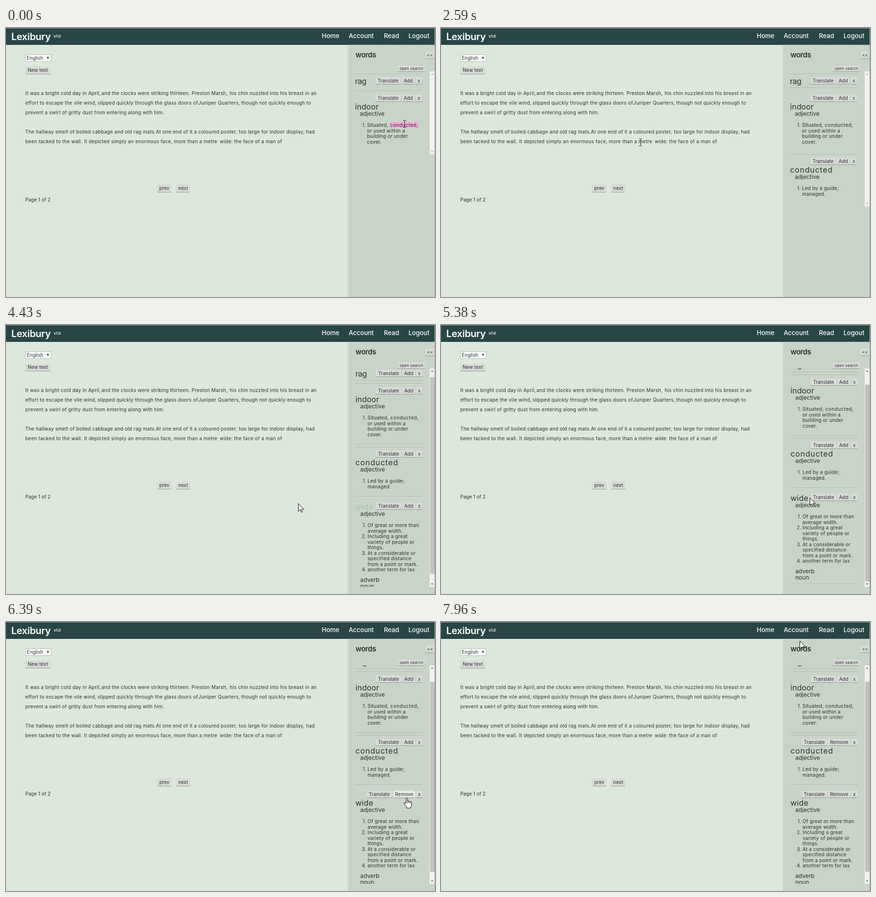
Write an HTML page that moves like this. It is 890 px wide and 558 px high and loops after 7.99 s.

```html
<!DOCTYPE html>
<html lang="en">
<head>
<meta charset="utf-8">
<title>Reader</title>
<style>
html, body { margin: 0; width: 100%; height: 100%; overflow: hidden; }
#stage {
  position: relative; width: 890px; height: 558px; overflow: hidden;
  background: #dde8dc; color: #29312d; font-family: Inter, "Open Sans", sans-serif;
}
#stage div, #stage svg { position: absolute; }
.t { line-height: 20px; white-space: pre; }
.b {
  height: 14px; line-height: 14px; font-size: 10px; text-align: center; white-space: pre;
  background: #d9dbd9; border-radius: 2px; box-shadow: 0 1px 1px #8d948e;
}
.b.over { background: #e7ece6; }
.busy .b { color: #868c87; }
.head { color: #fff; font-weight: 500; }
.brand { color: #fff; font-weight: 600; }
.num { width: 20px; text-align: right; }
.sel { background: #f6a9dd; }
.hr { left: 724px; width: 140px; height: 1px; background: #a9b4aa; border-bottom: 1px solid #d5ddd4; }
#header { left: 0; top: 0; width: 890px; height: 35px; background: #274645; box-shadow: inset 0 1px #849391, inset 0 -1px #1d3a39; }
#side { left: 710px; top: 35px; width: 180px; height: 523px; background: #c9d4c8; box-shadow: -1px 0 1px #cfdacf; }
#edge { left: 889px; top: 0; width: 1px; height: 558px; background: #a3aca4; }
#lang { left: 40px; top: 55px; width: 52px; height: 13px; background: #fff; border: 1px solid #b5bbb5; }
#list { left: 710px; width: 169px; overflow: hidden; }
#inner { left: -710px; top: 0; width: 890px; height: 600px; }
#bar { left: 879px; width: 10px; background: #f1f1f1; color: #a3a3a3; }
#bar.on { color: #505050; }
.tri { left: 3px; border: 2px solid transparent; }
#up { top: 4px; border-bottom: 3px solid; border-top: 0; }
#down { bottom: 4px; border-top: 3px solid; border-bottom: 0; }
#thumb { left: 1px; width: 9px; background: #c1c1c1; }
#cursor { left: 0; top: 0; width: 24px; height: 26px; overflow: visible; pointer-events: none; }
</style>
</head>
<body>
<div id="stage">
  <div id="header"></div>
  <div id="side"></div>
  <div id="lang"></div>
  <div id="list"><div id="inner"></div></div>
  <div id="bar"><div id="up" class="tri"></div><div id="thumb"></div><div id="down" class="tri"></div></div>
  <div id="edge"></div>
  <svg id="cursor">
    <path id="arrow" d="M.5 .5V16.5L4.2 13 6.6 18.6 9 17.5 6.7 12.2H11.8Z" fill="#fff" stroke="#000"/>
    <path id="beam" d="M-3 -7.5H-1L0 -6.5 1 -7.5H3M0 -6.5V6.5M-3 7.5H-1L0 6.5 1 7.5H3" fill="none" stroke="#111"/>
    <g id="hand" transform="translate(-6 2)">
      <path d="M5 13V2.2Q5 .6 6.5 .6T8 2.2V7.4Q10.6 6.8 10.9 8.2 13.3 7.6 13.7 9.2 16.4 8.8 16.4 11V15Q16.4 18 14.6 19.6V22H6.2V19.8Q3.8 17.4 1 12.8 .2 11 1.8 10.4 3 10.2 5 13Z" fill="#fff" stroke="#000"/>
      <path d="M8 7.5V11.5M10.9 8.3V11.5M13.7 9.3V11.8" stroke="#000" fill="none"/>
    </g>
  </svg>
</div>
<script>
const LOOP = 7990;
const $ = id => document.getElementById(id);
const stage = $('stage'), inner = $('inner'), list = $('list'), bar = $('bar');

function add(parent, cls, css, text = '') {
  const el = document.createElement('div');
  el.className = cls;
  el.style.cssText = css;
  el.textContent = text;
  parent.appendChild(el);
  return el;
}
// y is the middle of the line
const text = (p, x, y, s, size = 10, gap = 0, cls = '') =>
  add(p, 't ' + cls, `left:${x}px;top:${y - 10}px;font-size:${size}px;letter-spacing:${gap}px`, s);
const button = (p, x, y, w, s, h = 14) =>
  add(p, 'b', `left:${x}px;top:${y - h / 2}px;width:${w}px;height:${h}px;line-height:${h}px`, s);
const rule = (p, y) => add(p, 'hr', `top:${y}px`);
const group = p => add(p, '', 'left:0;top:0');
const show = (el, on) => { el.style.display = on ? '' : 'none'; };
const mark = (el, on) => el.classList.toggle('sel', on);

// header
text(stage, 11, 18, 'Lexibury', 20, -.3, 'brand');
text(stage, 99, 17, 'v1.0', 8, -.3, 'brand');
[[655, 'Home'], [711, 'Account'], [784, 'Read'], [835, 'Logout']]
  .forEach(([x, s]) => text(stage, x, 16, s, 13, 0, 'head'));

// reader
text(stage, 43, 62, 'English', 10);
add(stage, '', 'left:85px;top:60px;border:2.5px solid transparent;border-top:5px solid #222;border-bottom:0');
button(stage, 40, 87.5, 52, 'New text', 15);
button(stage, 314, 332, 29, 'prev', 16);
button(stage, 353, 332, 29, 'next', 16);
text(stage, 40, 356, 'Page 1 of 2');
const prose = [
  [135, 40, 'It was a bright cold day in April,', 198, 'and the clocks were striking thirteen.',
    385, 'Preston Marsh,', 464, 'his chin nuzzled into his breast in an'],
  [155, 40, 'effort to escape the vile wind,', 190, 'slipped quickly through the glass doors of',
    399, 'Juniper Quarters,', 488, 'though not quickly enough to'],
  [175, 40, 'prevent a swirl of gritty dust from entering along with him.'],
  [215, 40, 'The hallway smelt of boiled cabbage and old rag mats.', 311, 'At one end of it a coloured poster,',
    483, 'too large for indoor display, had'],
  [235, 40, 'been tacked to the wall.', 162, 'It depicted simply an enormous face,',
    348, 'more than a metre', 473, 'the face of a man of']
];
for (const [y, ...parts] of prose)
  for (let i = 0; i < parts.length; i += 2) text(stage, parts[i], y, parts[i + 1], 10, .24);
const picked = text(stage, 443.5, 235, 'wide:', 10, .24);
picked.style.cssText += 'line-height:12px;top:229px';

// sidebar
text(stage, 725, 56, 'words', 15, -.45).style.fontWeight = 600;
button(stage, 870, 56, 19, '<<');
button(stage, 813, 84, 56, 'open search', 12).style.cssText += 'font-size:8px;letter-spacing:.2px';
const adding = text(stage, 725, 105, 'adding word ...', 10, .1);

function tools(p, y) {
  const plain = group(p), saved = group(p);
  button(plain, 766, y, 53, 'Translate');
  button(plain, 821, y, 27, 'Add');
  button(saved, 747, y, 53, 'Translate');
  button(saved, 802, y, 46, 'Remove');
  button(p, 850, y, 13, 'x');
  return on => { show(plain, !on); show(saved, on); };
}
const word = (p, y, s, gap) => text(p, 724, y, s, 16, gap);
const kind = (p, y, s) => text(p, 734, y, s, 12);
function senses(p, y, items) {
  let n = 0;
  items.forEach((lines, i) => {
    text(p, 726, y + n * 11.5, i + 1 + '.', 10, 0, 'num');
    lines.split('|').forEach(s => text(p, 749, y + n++ * 11.5, s, 10, .25));
  });
}

rule(inner, 5);
const rag = group(inner), indoor = group(inner), conducted = group(inner), wide = group(inner);
tools(rag, 19)(false);
word(rag, 20, 'rag', -.5);
const endRag = rule(rag, 34), topIndoor = rule(indoor, 40);

tools(indoor, 55)(false);
word(indoor, 73, 'indoor', .15);
kind(indoor, 88, 'adjective');
senses(indoor, 111, ['Situated,|or used within a|building or under|cover.']);
const chosen = text(indoor, 796.5, 111, 'conducted,', 10, .55);
chosen.style.cssText += 'line-height:12px;top:105px';
const endIndoor = rule(indoor, 166);

rule(conducted, 172);
const saveConducted = tools(conducted, 186);
const newConducted = word(conducted, 204, 'conducted', .9);
kind(conducted, 219, 'adjective');
senses(conducted, 242, ['Led by a guide;|managed.']);
const endConducted = rule(conducted, 274);

const saveWide = tools(wide, 294);
const wideBody = group(wide);
const newWide = word(wideBody, 295.5, 'wide', .25);
kind(wideBody, 311, 'adjective');
senses(wideBody, 334, ['Of great or more than|average width.', 'Including a great|variety of people or|things.',
  'At a considerable or|specified distance|from a point or mark.', 'another term for lax']);
kind(wideBody, 448, 'adverb');
kind(wideBody, 461, 'noun');
rule(wideBody, 474);

// pointer: time, x, y
const path = [
  [0, 827, 199], [790, 827, 199], [880, 749, 245], [1120, 749, 245], [1400, 542, 293], [1830, 399, 281],
  [1920, 399, 281], [2160, 414, 237], [2590, 414, 237], [2880, 455, 237], [3670, 455, 237], [3700, 460, 249],
  [3830, 476, 285], [3960, 510, 327], [4080, 555, 354], [4200, 606, 370], [4970, 606, 370], [5070, 668, 383],
  [5200, 765, 358], [5490, 765, 358], [5920, 834, 358], [6200, 834, 358], [6400, 831, 362], [6850, 831, 362],
  [7080, 841, 245], [7750, 841, 245], [7960, 744, 39], [LOOP, 744, 39]
];
const clamp = v => Math.max(0, Math.min(1, v));
const ease = v => v * v * (3 - 2 * v);
function pointer(t) {
  const i = path.findIndex(p => p[0] > t), a = path[i - 1], b = path[i];
  const k = (t - a[0]) / (b[0] - a[0]);
  return [a[1] + (b[1] - a[1]) * k, a[2] + (b[2] - a[2]) * k];
}
const within = (t, a, b) => t >= a && t < b;

// a fresh word fades from pale green to ink
function fade(el, t, start) {
  const k = ease(clamp((t - start) / 490));
  const mix = [[184, 207, 188], [41, 49, 45]];
  el.style.color = `rgb(${mix[0].map((c, i) => Math.round(c + (mix[1][i] - c) * k))})`;
}

function draw(now) {
  const t = now % LOOP;
  const hasCond = t >= 1690, hasWide = t >= 4340, wideSaved = t >= 6200;
  const waiting = within(t, 280, 1690) || within(t, 3140, 4340);
  const top = waiting ? 121 : 90;
  const height = hasWide ? 453 : hasCond ? 280 : 172;
  const scroll = 18 * ease(clamp((t - 4520) / 230));

  show(adding, waiting);
  show(conducted, hasCond);
  show(wide, hasWide);
  show(endRag, t >= 280);
  show(topIndoor, t < 280 || hasWide);
  show(endIndoor, hasWide);
  show(endConducted, hasWide);
  saveWide(wideSaved);
  saveConducted(t >= 7310);
  wideBody.style.top = wideSaved ? '16px' : 0;
  fade(newConducted, t, 1690);
  fade(newWide, t, 4340);
  mark(chosen, t < 1120);
  mark(picked, within(t, 2890, 3980));
  list.classList.toggle('busy', within(t, 6050, 6200) || within(t, 7130, 7310));

  for (const el of [list, bar]) {
    el.style.top = top + 'px';
    el.style.height = height + 'px';
  }
  inner.style.transform = hasWide ? `translate(1px, ${-9 - scroll}px)` : 'none';
  bar.classList.toggle('on', hasWide);
  const full = wideSaved ? 487 : 471, track = 424, size = track * 453 / full;
  show($('thumb'), hasWide);
  $('thumb').style.height = size + 'px';
  $('thumb').style.top = 18 + (track - size) * scroll / (full - 453) + 'px';

  const [x, y] = pointer(t);
  const hit = document.elementFromPoint(x, y), over = hit && hit.closest('.b');
  document.querySelectorAll('.b.over').forEach(b => b.classList.remove('over'));
  if (over) over.classList.add('over');
  const beam = t < 280 || within(t, 2070, 3670);
  show($('beam'), beam);
  show($('hand'), over && !beam);
  show($('arrow'), !over && !beam);
  $('cursor').style.transform = `translate(${Math.round(x)}px, ${Math.round(y)}px)`;
}
function tick() {
  draw(performance.now());
  requestAnimationFrame(tick);
}
tick();
</script>
</body>
</html>
```
